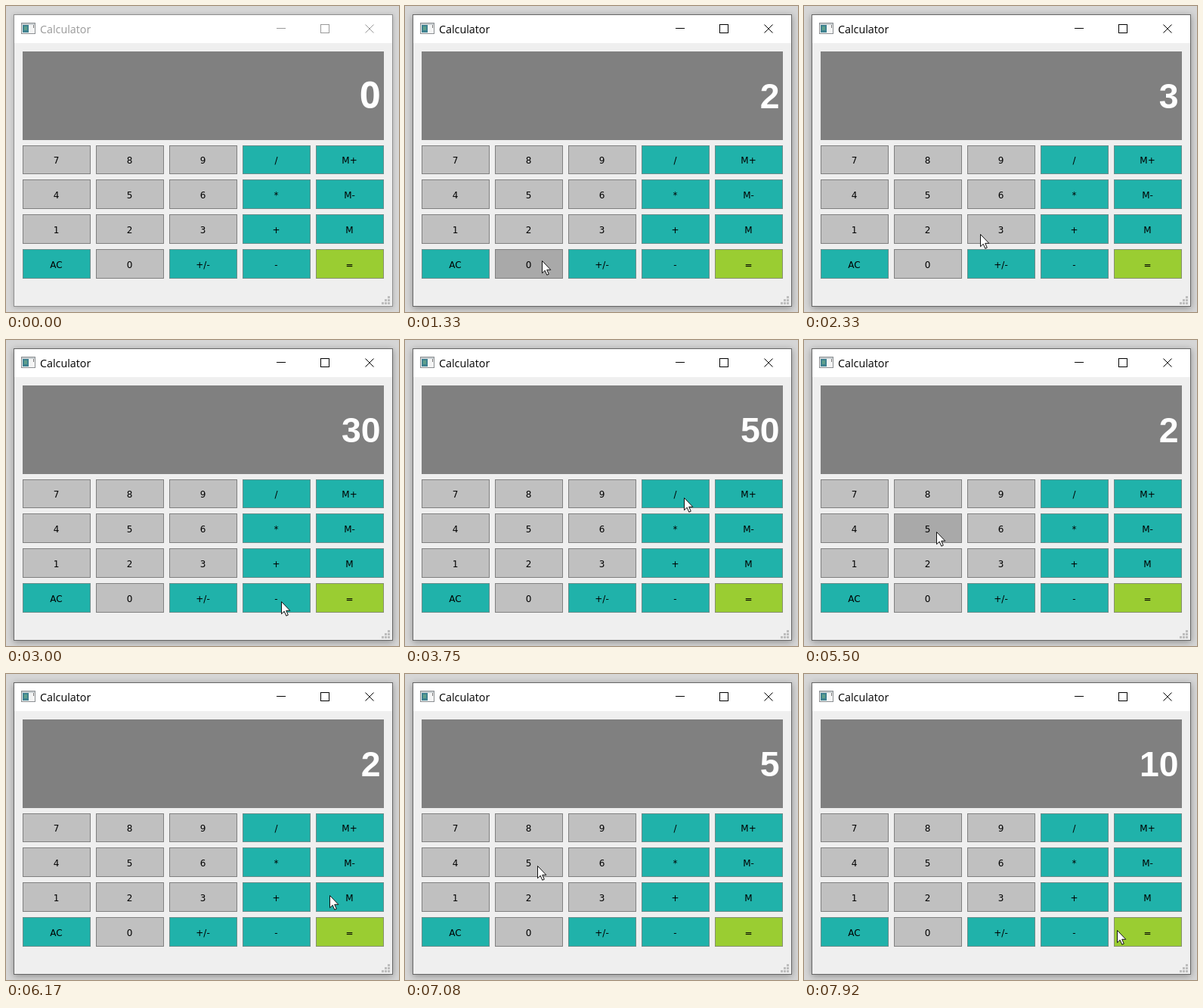
Write an HTML page that moves like this. It is 520 px wide and 404 px high and loops after 8000 ms.

```html
<!DOCTYPE html>
<html lang="en">
<head>
<meta charset="utf-8">
<title>Calculator</title>
<style>
  html, body { margin: 0; width: 100%; height: 100%; overflow: hidden; background: #d6d6d6; }
  svg { display: block; width: 520px; height: 404px; }
  rect { shape-rendering: crispEdges; }
  .frame { fill: #efefef; stroke: #8f8f8f; filter: drop-shadow(0 1px 3px #0003); }
  .active .frame { stroke: #666; filter: drop-shadow(0 2px 5px #0005); }
  .title { font: 14.3px "Open Sans", sans-serif; fill: #999; }
  .controls { fill: none; stroke: #999; }
  .active .title { fill: #000; }
  .active .controls { stroke: #000; }
  .key { stroke: var(--edge); fill: var(--up); }
  .key.down { fill: var(--down); }
  .digit { --up: #c0c0c0; --down: #a9a9a9; --edge: #808080; }
  .op { --up: #20b2aa; --down: #1a9690; --edge: #688c8a; }
  .equals { --up: #9acd32; --down: #83b02a; --edge: #868f70; }
  .label { font: 12px "DejaVu Sans", sans-serif; text-anchor: middle; }
  #value { font: bold 46.4px "Liberation Sans", Arial, sans-serif; fill: #fff; text-anchor: end; }
  #value.initial { font: bold 48px "Noto Sans", sans-serif; }
</style>
</head>
<body>
<svg id="stage" viewBox="0 0 520 404">
  <rect class="frame" x="10.5" y="11.5" width="501" height="385"/>
  <rect x="11" y="12" width="500" height="37" fill="#fff"/>

  <g id="icon">
    <rect x="20.5" y="22.5" width="18" height="14" fill="#f4f4f4" stroke="#8b8f92"/>
    <rect x="21" y="23" width="17" height="2" fill="#c9ced1"/>
    <rect x="22" y="25" width="8" height="10" fill="#3f8290"/>
    <rect x="24" y="27" width="4" height="5" fill="#5e9f8b"/>
    <rect x="36" y="25" width="1" height="4" fill="#777"/>
  </g>
  <text class="title" x="45" y="36">Calculator</text>
  <g class="controls">
    <path d="M358 29.5h12M475.5 24.5l11 11M486.5 24.5l-11 11"/>
    <rect x="416.5" y="24.5" width="11" height="11"/>
  </g>

  <rect x="22" y="60" width="478" height="117" fill="#808080"/>
  <text id="value" x="495.5" y="134.7"></text>
  <g id="keys"></g>
  <g id="grip" fill="#bdbdbd"></g>
  <path id="cursor" d="M.5.5v16.2l3.7-3.5 2.6 6 2.5-1.1-2.6-5.8h5.1z" fill="#fff" stroke="#111"/>
</svg>
<script>
const RATE = 12; // ticks per second
const LOOP_TICKS = 96;
const TRAVEL = 5; // ticks the pointer needs between keys
const $ = id => document.getElementById(id);

function add(parent, tag, attrs, text = "") {
  const el = document.createElementNS("http://www.w3.org/2000/svg", tag);
  for (const name in attrs) el.setAttribute(name, attrs[name]);
  el.textContent = text;
  parent.append(el);
  return el;
}

const layout = ["7 8 9 / M+", "4 5 6 * M-", "1 2 3 + M", "AC 0 +/- - ="];
const keys = {};
layout.forEach((line, row) => line.split(" ").forEach((name, col) => {
  const x = 22 + col * 97;
  const y = Math.round(183.6 + row * 45.7);
  const kind = /^\d$/.test(name) ? "digit" : name === "=" ? "equals" : "op";
  const el = add($("keys"), "rect", {
    class: "key " + kind, x: x + .5, y: y + .5, width: 89, height: row ? 38 : 37
  });
  add($("keys"), "text", { class: "label", x: x + 44.5, y: 208 + row * 46 }, name);
  keys[name] = { el, x: x + 45, y: y + 19 };
}));

for (let row = 0; row < 3; row++)
  for (let col = 2 - row; col < 3; col++)
    add($("grip"), "rect", { x: 497 + col * 4, y: 383 + row * 4, width: 3, height: 3 });

// The pointer rests at an offset from the key's centre, from arrival to release.
const click = (key, release, dx = 11, dy = 5, wait = 1) => ({
  key, release, arrive: release - wait, x: keys[key].x + dx, y: keys[key].y + dy
});
const clicks = [
  click("2", 12), click("0", 17, 17, -4), click("+", 22),
  click("3", 27, -17, -1), click("0", 32), click("=", 39),
  click("/", 50, 11, 5, 5), click("2", 61, 21, -11), click("5", 67),
  click("=", 72, 15, -15), click("*", 78, -8, -18), click("5", 85),
  click("=", 94, -41, -2)
];
const entry = { release: 0, x: 300, y: 335 };

const operations = { "+": (a, b) => a + b, "*": (a, b) => a * b, "/": (a, b) => a / b };

function displayAfter(done) {
  let stored, operation, text = "";
  for (const { key } of done) {
    if (key === "=") text = String(operation(stored, +text));
    else if (key in operations) [stored, operation, text] = [+text, operations[key], ""];
    else text += key;
  }
  return text;
}

function pointerAt(tick) {
  const i = clicks.findLastIndex(c => tick >= c.arrive - TRAVEL);
  // A click in progress holds the pointer until its release.
  const next = i > 0 && tick < clicks[i - 1].release ? i - 1 : i;
  const from = clicks[next - 1] || entry;
  const to = clicks[next];
  const start = Math.max(from.release, to.arrive - TRAVEL);
  const u = Math.min(1, (tick - start) / (to.arrive - start));
  const k = u * u * (3 - 2 * u);
  return [from.x + (to.x - from.x) * k, from.y + (to.y - from.y) * k].map(Math.round);
}

function render(time) {
  const tick = Math.floor((time + 4) * RATE / 1000) % LOOP_TICKS;
  const pressed = clicks.find(c => tick === c.release - 1);
  const done = clicks.filter(c => tick >= c.release);
  for (const name in keys) keys[name].el.classList.toggle("down", pressed?.key === name);
  $("stage").classList.toggle("active", tick >= clicks[0].arrive);
  $("value").classList.toggle("initial", !done.length);
  $("value").textContent = done.length ? displayAfter(done) : "0";

  const visible = tick >= clicks[0].arrive - TRAVEL;
  $("cursor").style.display = visible ? "" : "none";
  if (visible) $("cursor").setAttribute("transform", `translate(${pointerAt(tick)})`);
}

const start = performance.now();
function loop() {
  render(performance.now() - start);
  requestAnimationFrame(loop);
}
loop();
</script>
</body>
</html>
```
